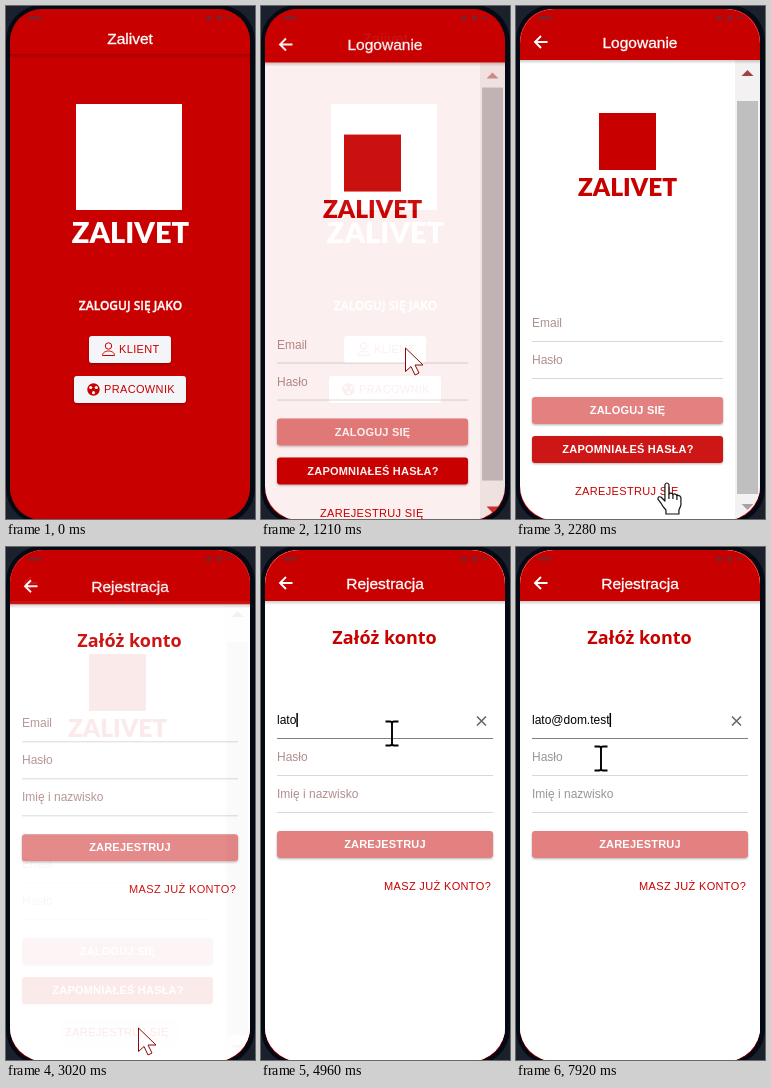
An HTML page that plays this animation: 249 by 513 pixels, repeating every 8000 ms.

```html
<!DOCTYPE html>
<html lang="pl">
<head>
<meta charset="utf-8">
<title>Zalivet</title>
<style>
  html, body { margin: 0; width: 100%; height: 100%; overflow: hidden; background: #1a212d; }
  svg { display: block; width: 249px; height: 513px; font-family: "Liberation Sans", Arial, sans-serif; }
  text { white-space: pre; }
  .title { font-size: 15.5px; fill: #fff; stroke: #fff; stroke-width: .3px; text-anchor: middle; }
  .field { font-size: 12px; fill: var(--hint, #b08f8f); }
  .typed { font-size: 12px; fill: #000; }
  .bold { font-size: 11px; font-weight: 700; letter-spacing: .2px; fill: #fff; text-anchor: middle; }
  .link { font-size: 11px; letter-spacing: .35px; fill: #c80000; }
  .heading { font-family: "Open Sans", sans-serif; text-anchor: middle; }
  .prompt { font-size: 12px; font-weight: 600; fill: #fff; stroke: #fff; stroke-width: .3px; }
  .brand { font-family: Lato, sans-serif; font-weight: 900; text-anchor: middle; }
</style>
</head>
<body>
<svg id="stage" viewBox="0 0 249 513" xmlns="http://www.w3.org/2000/svg"></svg>
<script>
const RED = '#c80000';
const LOOP = 8000;
const EMAIL = 'lato@dom.test';
const KEY_TIMES = [4760, 4830, 4860, 4960, 5570, 5830, 5960, 6110, 6240, 6440, 6590, 6650, 6850];
const FOCUS = 3960, BLINK = 530;
const LOGIN_START = 1074, REGISTER_START = 2896, SLIDE = 280;
const CLICKS = [[860, 1020], [2680, 2860], [3880, 4090]];

// time, x, y, pointer shape from that time on
const POINTER = [
  [250, 232, 482, 'arrow'], [610, 150, 352, 'hand'], [670, 144, 342, 'hand'],
  [1080, 144, 342, 'arrow'], [1380, 144, 342, 'arrow'], [1560, 150, 400, 'arrow'],
  [1950, 150, 400, 'arrow'], [2010, 149, 444, 'hand'], [2270, 149, 444, 'hand'],
  [2280, 151, 477, 'hand'], [2530, 132, 481, 'hand'], [2890, 132, 481, 'arrow'],
  [3060, 132, 481, 'arrow'], [3490, 168, 312, 'arrow'], [3600, 152, 258, 'ibeam'],
  [3760, 131, 186, 'ibeam'], [7600, 131, 186, 'ibeam'], [7920, 85, 211, 'ibeam']
];

const text = (cls, x, y, value, extra = '') => `<text class="${cls}" x="${x}" y="${y}" ${extra}>${value}</text>`;
const box = (x, y, w, h, fill, extra = '') =>
  `<rect x="${x}" y="${y}" width="${w}" height="${h}" fill="${fill}" ${extra}/>`;
const button = (x, y, w, fill, extra = '') => box(x, y, w, 27, fill, `rx="3" ${extra}`);

const field = (y, width, name, lineId = '', labelId = '') =>
  text('field', 16, y, name, labelId && `id="${labelId}"`) +
  box(16, y + 14, width, 1, '#d8d8d8', lineId && `id="${lineId}"`);

const header = title => `
  ${box(0, 54, 249, 4, 'url(#shade)')}
  ${box(0, -50, 249, 104, RED)}
  ${text('title', 124, 41.5, title)}
  <path d="M31.5 36H19.5M25 30l-6 6 6 6" fill="none" stroke="#fff" stroke-width="1.9"/>`;

const startPage = `
  ${box(0, 0, 249, 520, RED)}
  ${box(0, 48, 249, 4, 'url(#shade)')}
  ${text('title', 124, 38, 'Zalivet')}
  ${box(70, 98, 106, 106, '#fff')}
  ${text('brand', 124.5, 237, 'ZALIVET', 'font-size="29" fill="#fff"')}
  ${text('heading prompt', 124.5, 304, 'ZALOGUJ SIĘ JAKO')}
  ${button(83, 330, 82, '#f4f5f8', 'id="client" filter="url(#drop)"')}
  <g fill="none" stroke="${RED}" stroke-width="1">
    <circle cx="102.5" cy="340" r="3.2"/>
    <path d="M96.5 349.5c0-3 3-4.5 6-4.5s6 1.5 6 4.5z" stroke-linejoin="round"/>
  </g>
  ${text('link', 113, 347, 'KLIENT')}
  ${button(68, 370, 112, '#f4f5f8', 'filter="url(#drop)"')}
  <circle cx="87.5" cy="383.5" r="6.2" fill="${RED}"/>
  <g fill="#f4f5f8">
    <circle cx="84.7" cy="381.5" r="1.6"/>
    <circle cx="90.3" cy="381.5" r="1.6"/>
    <circle cx="87.5" cy="386.7" r="1.6"/>
  </g>
  ${text('link', 98, 387, 'PRACOWNIK')}`;

const loginPage = `
  ${box(0, 0, 249, 560, '#fff')}
  <g id="content">
    ${box(83, 107, 57, 57, RED)}
    ${text('brand', 111.5, 190, 'ZALIVET', `font-size="24.5" fill="${RED}"`)}
    ${field(321, 191, 'Email')}
    ${field(358, 191, 'Hasło')}
    ${button(16, 391, 191, '#e38080', 'filter="url(#drop)"')}
    ${text('bold', 111.5, 408, 'ZALOGUJ SIĘ')}
    ${button(16, 430, 191, RED, 'id="forgot" filter="url(#drop)"')}
    ${text('bold', 112, 447, 'ZAPOMNIAŁEŚ HASŁA?')}
    ${box(55, 472, 118, 27, RED, 'id="joinHover" rx="3"')}
    ${text('link', 59, 489, 'ZAREJESTRUJ SIĘ')}
  </g>
  ${box(219, 54, 26, 480, '#f3f1f1')}
  ${box(221, 79, 21, 393, '#c0bfbf', 'id="thumb"')}
  <path id="up" d="M225.5 70l6-6 6 6z"/>
  <path id="down" d="M225.5 498l6 6 6-6z"/>
  ${header('Logowanie')}`;

const registerPage = `
  ${box(0, 0, 249, 560, '#fff')}
  ${text('heading', 123.5, 97, 'Załóż konto', `font-size="18" font-weight="700" fill="${RED}"`)}
  ${field(177, 216, 'Email', 'emailLine', 'emailHint')}
  ${field(214, 216, 'Hasło')}
  ${field(251, 216, 'Imię i nazwisko')}
  ${text('typed', 16, 177, '', 'id="typed"')}
  ${box(16, 166, 1.5, 14, '#000', 'id="caret"')}
  <path id="clear" d="M216 169.5l9 9M225 169.5l-9 9" stroke="#666" stroke-width="1.6"/>
  ${button(16, 284, 216, '#e38080', 'filter="url(#drop)"')}
  ${text('bold', 124, 301, 'ZAREJESTRUJ')}
  ${text('link', 123, 343, 'MASZ JUŻ KONTO?')}
  ${header('Rejestracja')}`;

const pointers = `
  <path id="arrow" d="M.5 0V23.5l5.5-5 4 8.5 4-2-4-8h8z" fill="#fff" stroke="#8a0808" stroke-width="1"/>
  <g id="hand" fill="#fff" stroke="#111" stroke-width="1.2" stroke-linejoin="round">
    <path d="M-2 1.5q2-3 4 0V11q2-2 4 .5 2-1.5 4 1 3-1 4 2V22q-1 3-2 5v4H-1v-4q-3-3-5-7l-3-4q0-3 3-2l4 4z"/>
    <path d="M2 11v5M6 12v4M10 13v4" fill="none"/>
  </g>
  <path id="ibeam" d="M-6.5-11.5h4.5q2 0 2 2 0-2 2-2h4.5M0-10V11M-6.5 12.5h4.5q2 0 2-2 0 2 2 2h4.5"
    fill="none" stroke="#000" stroke-width="1.9"/>`;

document.getElementById('stage').innerHTML = `
  <defs>
    <clipPath id="screen"><rect x="4" y="3" width="240" height="511" rx="34"/></clipPath>
    <linearGradient id="shade" x2="0" y2="1">
      <stop stop-opacity=".2"/><stop offset="1" stop-opacity="0"/>
    </linearGradient>
    <filter id="drop" x="-10%" y="-30%" width="120%" height="180%">
      <feDropShadow dx="0" dy="1" stdDeviation="1" flood-opacity=".3"/>
    </filter>
  </defs>
  ${box(0, 0, 249, 513, '#1a212d')}
  ${box(0, -1, 249, 519, '#040a14', 'rx="36"')}
  ${box(4, 3, 240, 511, RED, 'rx="32"')}
  <g clip-path="url(#screen)">
    <g id="start">${startPage}</g>
    <g id="login">${loginPage}</g>
    <g id="register">${registerPage}</g>
    <g fill="#8e1a22">
      <rect x="22" y="10" width="14" height="4" rx="2"/>
      <rect x="200" y="9.5" width="6" height="5" rx="1"/>
      <circle cx="213.5" cy="12" r="3"/>
      <path d="M220 10h7l-3.5 4.5z"/>
    </g>
  </g>
  <circle id="glow" r="18" fill="#ffee00" opacity=".62"/>
  <g id="pointer">${pointers}</g>`;

const el = {};
document.querySelectorAll('[id]').forEach(node => el[node.id] = node);
const show = (node, on) => node.setAttribute('display', on ? 'inline' : 'none');
const clamp = v => Math.max(0, Math.min(1, v));

// cubic-bezier(.36, .66, .04, 1)
function ease(x) {
  const curve = (s, a, b) => 3 * (1 - s) ** 2 * s * a + 3 * (1 - s) * s * s * b + s ** 3;
  let low = 0, high = 1;
  for (let i = 0; i < 24; i++) {
    const mid = (low + high) / 2;
    if (curve(mid, .36, .04) < x) low = mid; else high = mid;
  }
  return curve(low, .66, 1);
}

function slidePage(page, t, start) {
  const p = ease(clamp((t - start) / SLIDE));
  show(page, t >= start);
  page.setAttribute('opacity', t >= start + SLIDE ? 1 : .01 + .99 * p);
  page.setAttribute('transform', `translate(0 ${(40 * (1 - p)).toFixed(2)})`);
}

function drawPointer(t) {
  const i = POINTER.findLastIndex(key => key[0] <= t);
  show(el.pointer, i >= 0);
  show(el.glow, CLICKS.some(([from, to]) => t >= from && t < to));
  if (i < 0) return;
  const [t0, x0, y0, shape] = POINTER[i];
  const [t1, x1, y1] = POINTER[i + 1] || [LOOP, x0, y0];
  const p = (t - t0) / (t1 - t0);
  const at = `translate(${x0 + (x1 - x0) * p} ${y0 + (y1 - y0) * p})`;
  el.pointer.setAttribute('transform', at);
  el.glow.setAttribute('transform', at);
  for (const name of ['arrow', 'hand', 'ibeam']) show(el[name], name === shape);
}

function drawLogin(t) {
  const scroll = t < 1950 ? 0 : t < 2010 ? 10 : 19;
  el.content.setAttribute('transform', `translate(0 ${19 - scroll})`);
  el.thumb.setAttribute('y', 79 + scroll * 16 / 19);
  el.up.setAttribute('fill', scroll ? '#9e4444' : '#d09090');
  el.down.setAttribute('fill', scroll ? '#a5a5a5' : '#d03030');
  el.forgot.setAttribute('fill', t >= 2010 && t < 2400 ? '#cd1414' : RED);
  el.joinHover.setAttribute('opacity', .05 * clamp((t - 2320) / 200));
}

function drawRegister(t) {
  const count = KEY_TIMES.filter(k => k <= t).length;
  const lastInput = count ? KEY_TIMES[count - 1] : FOCUS;
  el.typed.textContent = EMAIL.slice(0, count);
  show(el.emailHint, !count);
  show(el.clear, count);
  show(el.caret, t >= FOCUS && Math.floor((t - lastInput) / BLINK) % 2 === 0);
  el.caret.setAttribute('x', 16 + (count ? el.typed.getComputedTextLength() : 0));
  el.emailLine.setAttribute('fill', t >= FOCUS ? '#808080' : '#d8d8d8');
  el.stage.style.setProperty('--hint', t >= 6110 ? '#979797' : '#b08f8f');
}

function render(t) {
  el.client.setAttribute('fill', t >= 610 ? '#fafbfd' : '#f4f5f8');
  slidePage(el.login, t, LOGIN_START);
  slidePage(el.register, t, REGISTER_START);
  drawLogin(t);
  drawRegister(t);
  drawPointer(t);
}

const began = performance.now();
function tick() {
  render((performance.now() - began) % LOOP);
  requestAnimationFrame(tick);
}
tick();
</script>
</body>
</html>
```
